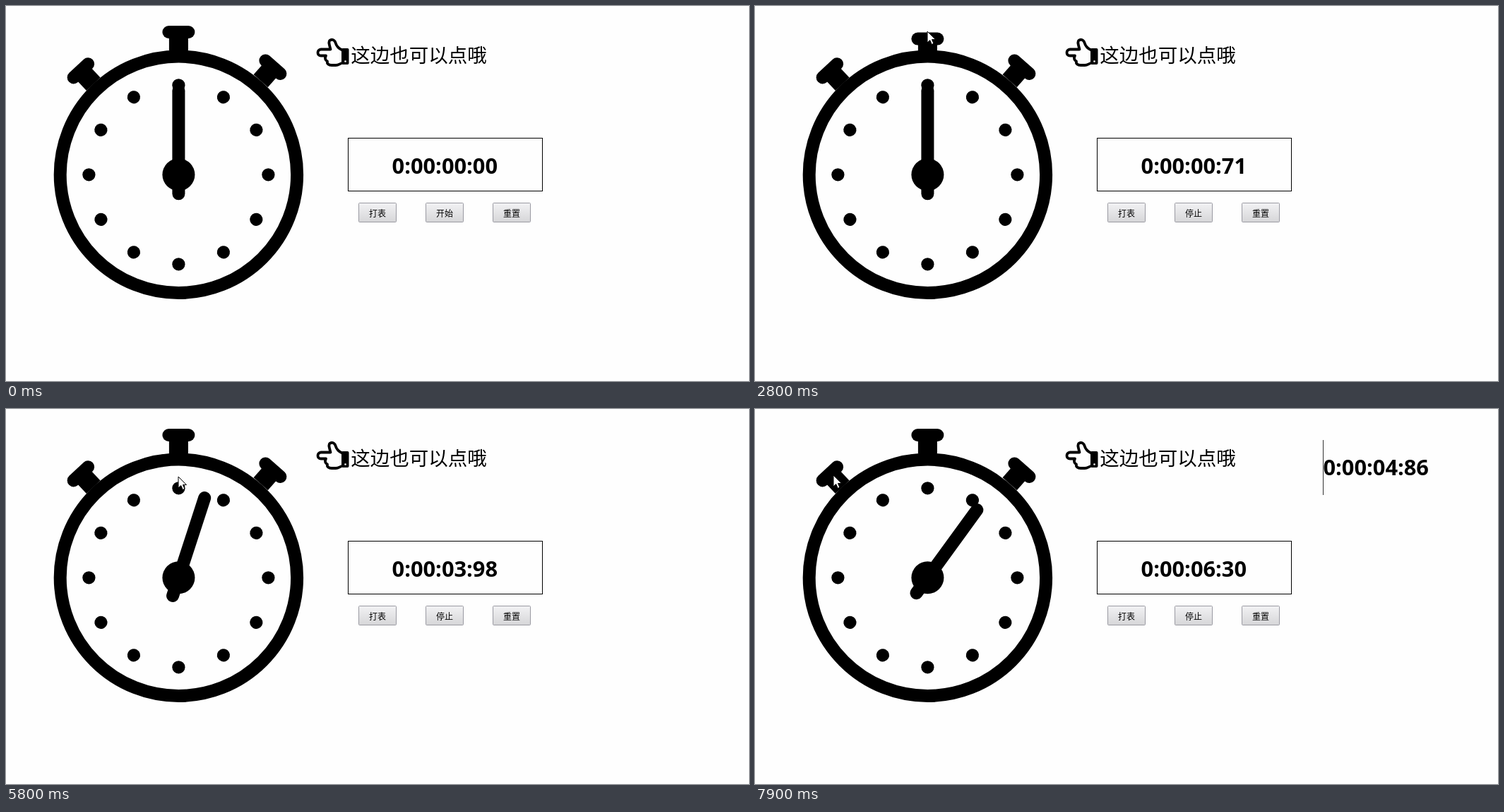
Animation of 1052 by 532 pixels, one loop 8 s. Source, as an HTML page:

```html
<!DOCTYPE html>
<html lang="zh">
<head>
<meta charset="utf-8">
<title>秒表</title>
<style>
html, body { margin: 0; width: 100%; height: 100%; overflow: hidden; background: #fefefe; }
svg { display: block; width: 1052px; height: 532px; }
.digits { font: bold 30.8px "Open Sans", "Noto Sans", sans-serif; }
.hint { font: 300 27.5px "Noto Sans CJK SC Light", "Noto Sans CJK SC DemiLight", "Noto Sans CJK SC", "Noto Sans CJK", sans-serif; }
.label { font: 12px "Noto Sans CJK SC", "Noto Sans CJK", sans-serif; text-anchor: middle; }
</style>
</head>
<body>
<svg viewBox="0 0 1052 532">
  <defs>
    <linearGradient id="face" x2="0" y2="1">
      <stop offset="0" stop-color="#f2f2f4"/>
      <stop offset="1" stop-color="#d6d6d8"/>
    </linearGradient>
    <g id="crown">
      <rect x="-23" y="-9" width="46" height="18" rx="9"/>
      <rect x="-13.5" width="27" height="26"/>
    </g>
  </defs>

  <g id="watch" transform="translate(244.4 239.3)">
    <use href="#crown" id="topCrown"/>
    <use href="#crown" id="leftCrown"/>
    <use href="#crown" transform="translate(133.5 -152.5) rotate(41.5)"/>
    <circle r="167.700" fill="none" stroke="#000" stroke-width="18"/>
    <line id="hand" y1="-119" y2="27" stroke="#000" stroke-width="18" stroke-linecap="round"/>
    <circle r="23"/>
  </g>

  <path d="M476 62.500C470 60 467.500 55.500 466.500 52C465 47.500 461 46.800 458.500 48.800C456 51 458 55 459.500 61.500H446C440 62 440 70.500 446 70.500H453C451 74 452 77 455 78.500C454 82 457 84 461 84H467C471 84 473 81.500 476 81"
    fill="none" stroke="#000" stroke-width="3.8" stroke-linejoin="round"/>
  <rect x="475" y="60" width="10.500" height="23" rx="2"/>
  <circle cx="480.500" cy="78.500" r="1.300" fill="#fefefe"/>
  <text class="hint" x="488.300" y="80">这边也可以点哦</text>

  <rect x="484.5" y="187.5" width="275" height="75" fill="none" stroke="#000"/>
  <text class="digits" id="clock" x="621.300" y="238" text-anchor="middle"></text>
  <g id="buttons"></g>

  <g id="lap">
    <path d="M804.5 44V122" stroke="#333"/>
    <text class="digits" id="lapText" y="94">0:00:04:86</text>
  </g>
  <path id="cursor" d="M0 0V16L3.700 12.600L6.300 18.500L9 17.300L6.500 11.600H11.500Z" fill="#fff" stroke="#000"/>
</svg>
<script>
const LOOP = 8000, STEP = 100;
const START = 2135, LAP = 6585, LAP_TEXT = 7000;
const PRESS = 912, PRESS_DEPTH = 17;

const $ = id => document.getElementById(id);
const set = (el, attrs) => { for (const k in attrs) el.setAttribute(k, attrs[k]); return el; };
const add = (parent, tag, attrs) =>
  parent.appendChild(set(document.createElementNS("http://www.w3.org/2000/svg", tag), attrs));
const smooth = p => p * p * (3 - 2 * p);
const pad = n => String(n).padStart(2, "0");

// Resting points of the pointer: time, x, y.
const stops = [
  [100, 1040, 26], [600, 715, 105], [1200, 250, 88], [1800, 258, 53], [2000, 244, 36],
  [4300, 244, 36], [4900, 498, 177], [5800, 244, 96], [6400, 111, 94]
];

function pointer(t) {
  const i = stops.findIndex(s => s[0] > t);
  if (i < 1) return stops.at(i).slice(1);
  const [t0, x0, y0] = stops[i - 1], [t1, x1, y1] = stops[i];
  const p = smooth((t - t0) / (t1 - t0));
  return [x0 + (x1 - x0) * p, y0 + (y1 - y0) * p];
}

// The stopwatch runs a little faster than the page, and slowly gains.
function elapsed(t) {
  const s = (t - 2800) / 1000;
  return t < START ? 0 : Math.max(0, 0.7195 + 1.0826 * s + 0.0025 * s * s);
}

// Down and back up, eased at both ends.
function pressDepth(t, start) {
  const p = (t - start) / PRESS;
  return p <= 0 || p >= 1 ? 0 : PRESS_DEPTH * smooth(1 - Math.abs(2 * p - 1));
}

// Damped swing of the lap time around its resting place.
function swing(t) {
  const s = (t - LAP_TEXT) / 1000;
  return 44 * Math.exp(-s / 0.2) * Math.cos(2 * Math.PI * s / 0.28);
}

for (let i = 0; i < 12; i++)
  add($("watch"), "circle", { cy: -127, r: 9.1, transform: `rotate(${i * 30})` });

const labels = ["打表", "开始", "重置"].map((name, i) => {
  const x = 499.5 + Math.round(i * 94.8), g = $("buttons");
  add(g, "rect", { x, y: 279.5, width: 53, height: 27, rx: 1, fill: "url(#face)", stroke: "#9a9aa2" });
  const text = add(g, "text", { class: "label", x: x + 26.5, y: 298.5 });
  text.textContent = name;
  return text;
});

function render(t) {
  const hundredths = Math.floor(elapsed(t) * 100);
  const seconds = Math.floor(hundredths / 100);
  $("clock").textContent = `0:00:${pad(seconds)}:${pad(hundredths % 100)}`;
  set($("hand"), { transform: `rotate(${seconds * 6})` });
  labels[1].textContent = t >= START ? "停止" : "开始";

  set($("topCrown"), { transform: `translate(0 ${pressDepth(t, START) - 202.3})` });
  set($("leftCrown"), { transform: `rotate(-43.2) translate(0 ${pressDepth(t, LAP) - 202.3})` });

  set($("lap"), { visibility: t >= LAP ? "visible" : "hidden" });
  set($("lapText"), { x: 804.4 + swing(t), display: t >= LAP_TEXT ? "inline" : "none" });

  const [x, y] = pointer(t);
  set($("cursor"), { transform: `translate(${x} ${y})`, visibility: t >= stops[0][0] ? "visible" : "hidden" });
}

const origin = performance.now();
function tick() {
  const t = (performance.now() - origin) % LOOP;
  render(Math.floor(t / STEP) * STEP);
  requestAnimationFrame(tick);
}
tick();
</script>
</body>
</html>
```
